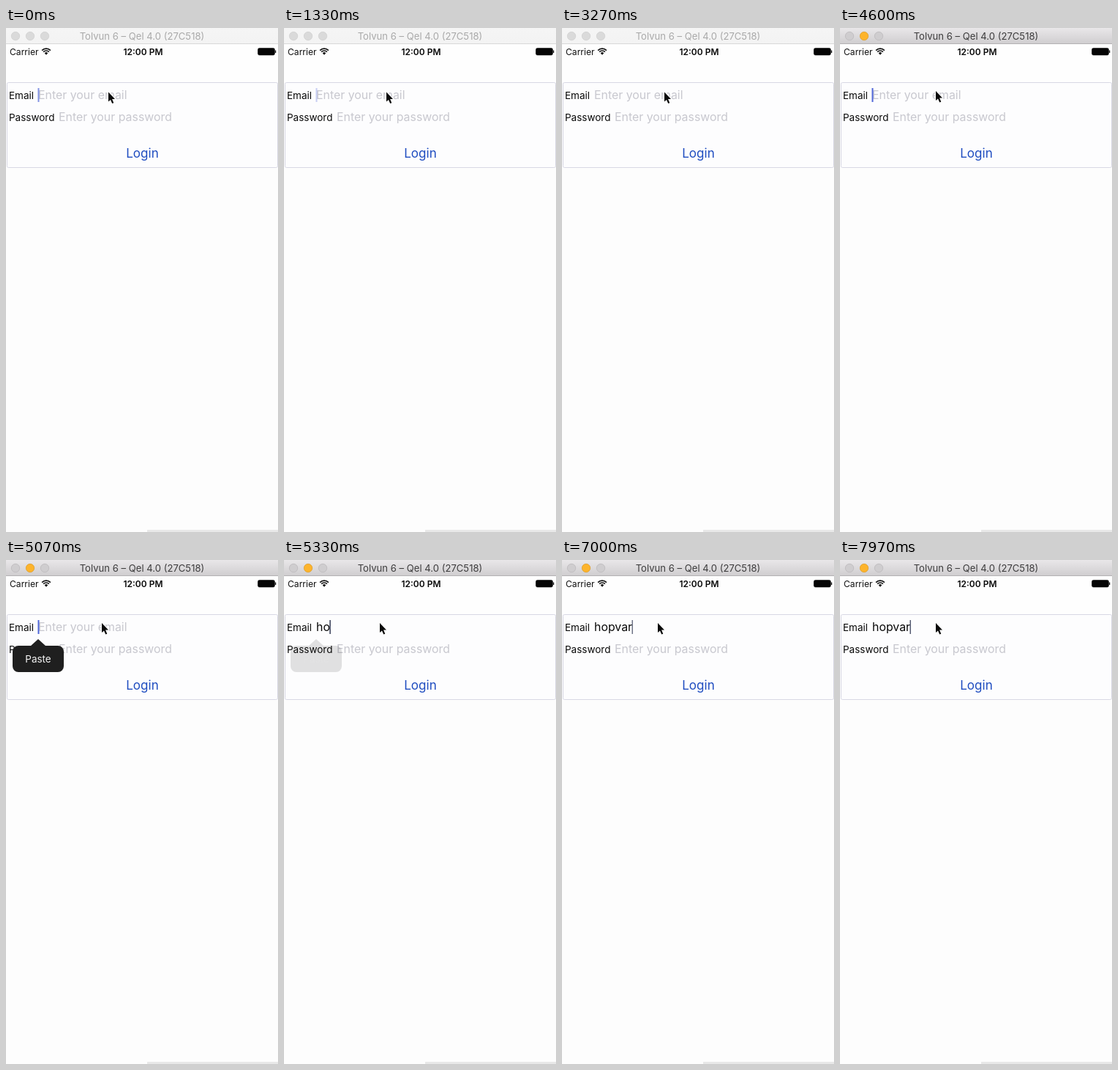
An HTML page with a canvas that plays this animation: 372x688 px, repeating every 8000 ms.

```html
<!DOCTYPE html>
<html lang="en">
<head>
<meta charset="utf-8">
<title>Login form</title>
<style>
  html, body { margin: 0; width: 100%; height: 100%; overflow: hidden; background: #fdfdfd; }
  canvas { display: block; width: 372px; height: 688px; }
</style>
</head>
<body>
<canvas id="stage"></canvas>
<script>
const W = 372, H = 688, LOOP = 8000;
const FONT = 'Inter, Roboto, sans-serif';
const TITLE = 'Tolvun 6 – Qel 4.0 (27C518)';
const USER = 'hopvar';
const ACTIVATE = 4470, TYPE_START = 5110, TYPE_STEP = 125;

const canvas = document.getElementById('stage');
const ctx = canvas.getContext('2d');
const dpr = window.devicePixelRatio || 1;
canvas.width = W * dpr;
canvas.height = H * dpr;

const ramp = (t, a, b) => Math.min(1, Math.max(0, (t - a) / (b - a)));
const smooth = p => p * p * (3 - 2 * p);
const mix = (a, b, p) => a + (b - a) * p;

function rect(x, y, w, h, color) {
  ctx.fillStyle = color;
  ctx.fillRect(x, y, w, h);
}

function roundRect(x, y, w, h, r) {
  ctx.beginPath();
  ctx.moveTo(x + r, y);
  ctx.arcTo(x + w, y, x + w, y + h, r);
  ctx.arcTo(x + w, y + h, x, y + h, r);
  ctx.arcTo(x, y + h, x, y, r);
  ctx.arcTo(x, y, x + w, y, r);
  ctx.closePath();
}

function polygon(points) {
  ctx.beginPath();
  points.forEach(([x, y]) => ctx.lineTo(x, y));
  ctx.closePath();
}

function text(str, x, y, size, color, align = 'left', weight = 400) {
  ctx.font = `${weight} ${size}px ${FONT}`;
  ctx.textAlign = align;
  ctx.textBaseline = 'alphabetic';
  ctx.fillStyle = color;
  ctx.fillText(str, x, y);
}

function titleBar(active) {
  const g = ctx.createLinearGradient(0, 0, 0, 21);
  g.addColorStop(0, active ? '#e9e7e9' : '#f5f5f5');
  g.addColorStop(1, active ? '#d0ced0' : '#f3f3f3');
  rect(0, 0, W, 21, g);
  rect(0, 21, W, 1, active ? '#b3b1b3' : '#d8d8d8');
  const off = active ? '#cfcdcf' : '#dadada';
  const lights = [off, active ? '#fdb42c' : off, off];
  lights.forEach((color, i) => {
    ctx.beginPath();
    ctx.arc(13 + 20 * i, 11, 5.7, 0, Math.PI * 2);
    ctx.fillStyle = color;
    ctx.fill();
    ctx.lineWidth = 0.7;
    ctx.strokeStyle = active ? (i === 1 ? '#dc9a25' : '#b9b7b9') : '#cdcdcd';
    ctx.stroke();
  });
  text(TITLE, 186, 16, 13.1, active ? '#3d3c3d' : '#a9a9a9', 'center');
}

function statusBar() {
  text('Carrier', 5, 37, 12.1, '#111', 'left');
  text('12:00 PM', 187.5, 37, 12, '#0a0a0a', 'center', 600);

  // Wi-Fi arcs above a small wedge
  ctx.strokeStyle = ctx.fillStyle = '#111';
  ctx.lineWidth = 1.7;
  [8.3, 5.5].forEach(r => {
    ctx.beginPath();
    ctx.arc(55, 36.5, r, -Math.PI * 0.75, -Math.PI * 0.25);
    ctx.stroke();
  });
  ctx.beginPath();
  ctx.moveTo(55, 36.8);
  ctx.arc(55, 36.5, 3.2, -Math.PI * 0.75, -Math.PI * 0.25);
  ctx.fill();

  roundRect(344.5, 27.5, 23, 9.5, 2);
  ctx.lineWidth = 1;
  ctx.strokeStyle = '#777';
  ctx.stroke();
  ctx.fillStyle = '#050505';
  ctx.fill();
  rect(368, 30.5, 1.3, 3.5, '#222');
}

// The caret blinks once a second and stays lit from the tap until typing ends.
function caretAlpha(t) {
  if (t >= 4630 && t < 5800) return 1;
  const ph = t % 1000;
  if (ph >= 270 && ph < 800) return 1 - (1 - ramp(ph, 270, 630)) ** 2;
  const out = ramp((ph + 200) % 1000, 0, 300);
  return ph < 270 && ph >= 100 ? 0 : 1 - out ** 3;
}

function form(t) {
  roundRect(1.5, 74.5, 370, 116, 2);
  ctx.fillStyle = '#fdfdfe';
  ctx.fill();
  ctx.lineWidth = 1;
  ctx.strokeStyle = '#d8d8e4';
  ctx.stroke();

  const hint = '#c8c8cf';
  const count = t < TYPE_START ? 0
    : Math.min(USER.length, 1 + Math.floor((t - TYPE_START) / TYPE_STEP));
  const typed = USER.slice(0, count);

  text('Email', 4, 97, 13.5, '#0a0a0a');
  text('Password', 4, 127, 13.5, '#0a0a0a');
  text('Enter your password', 72, 127, 15.9, hint);
  text('Login', 186.5, 177, 17.1, '#1f4dc0', 'center');
  text(typed || 'Enter your email', 44, 97, 15.9, typed ? '#0a0a0a' : hint);

  const x = typed ? 44 + ctx.measureText(typed).width - 0.6 : 43.5;
  ctx.globalAlpha = caretAlpha(t);
  rect(x, 82, typed ? 1.5 : 2, 19, typed ? '#333a55' : '#4f66d8');
  ctx.globalAlpha = 1;
}

function pasteMenu(t) {
  const alpha = smooth(ramp(t, 4800, 5060)) * (1 - smooth(ramp(t, 5090, 5400)));
  if (!alpha) return;
  ctx.globalAlpha = alpha;
  ctx.fillStyle = '#1f1f1f';
  // One path, so the arrow and the body fade as a single shape
  roundRect(9, 117, 70, 36, 8);
  ctx.moveTo(34, 117);
  ctx.lineTo(44, 108);
  ctx.lineTo(54, 117);
  ctx.closePath();
  ctx.fill();
  text('Paste', 44, 140, 13.5, '#f4f4f4', 'center');
  ctx.globalAlpha = 1;
}

function pointer(t) {
  const p = smooth(ramp(t, 4290, 4450));
  ctx.save();
  ctx.translate(mix(140, 131, p), mix(87.5, 86, p));
  polygon([[0, 0], [0, 13], [3, 10.4], [5.2, 15.6], [7.3, 14.7], [5.1, 9.6], [9, 9.4]]);
  ctx.lineJoin = 'round';
  ctx.lineWidth = 1.8;
  ctx.strokeStyle = '#fff';
  ctx.stroke();
  ctx.fillStyle = '#0a0a0a';
  ctx.fill();
  ctx.restore();
}

function draw(t) {
  ctx.setTransform(dpr, 0, 0, dpr, 0, 0);
  rect(0, 0, W, H, '#fdfdfd');
  rect(0, 22, W, 52, '#fefefe');
  rect(193, 685, 179, 3, '#e8e8e8');
  titleBar(t >= ACTIVATE);
  statusBar();
  form(t);
  pasteMenu(t);
  pointer(t);
}

const start = performance.now();
function tick() {
  draw((performance.now() - start) % LOOP);
  requestAnimationFrame(tick);
}
tick();
</script>
</body>
</html>
```
